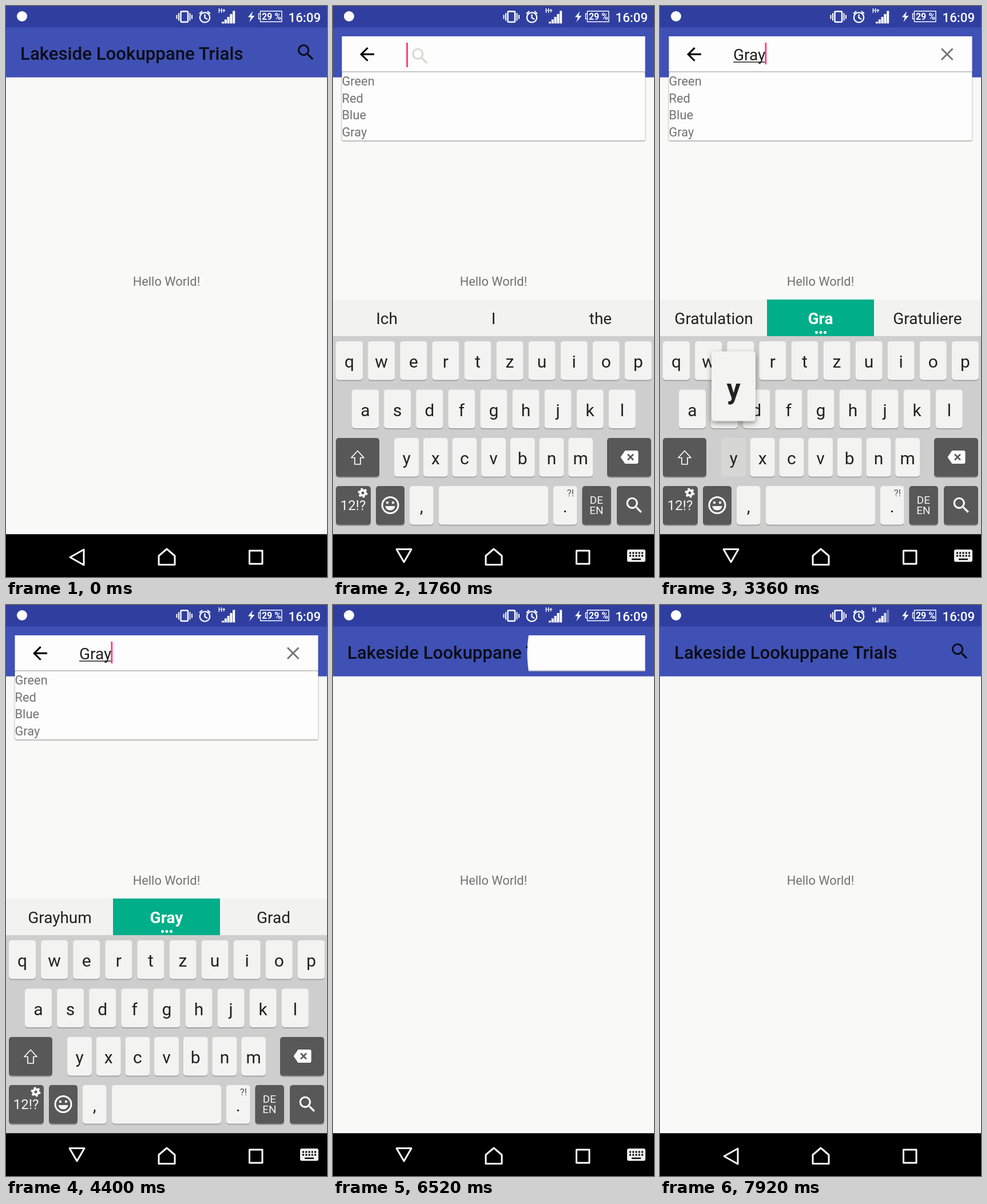
Write an HTML page that moves like this. It is 561 by 998 pixels and loops after 7960 ms.

```html
<!DOCTYPE html>
<html lang="en">
<head>
<meta charset="utf-8">
<title>Search bar demo</title>
<style>
html, body { margin: 0; width: 100%; height: 100%; overflow: hidden; background: #f9f9f8; }
svg { display: block; font-family: Roboto, sans-serif; }
body > svg { width: 100vw; height: 100vh; }
.mid { text-anchor: middle; }
.small { font-size: 21.8px; fill: #727272; }
.line { fill: none; stroke: #fff; stroke-width: 3; stroke-linejoin: round; }
#kb { font-size: 30px; fill: #212121; }
#kb .word { font-size: 28px; }
#popup { filter: drop-shadow(0 4px 5px #0006); }
#sheet { filter: drop-shadow(0 1px 1px #0007); }
</style>
</head>
<body>
<svg viewBox="0 0 561 998">
  <defs>
    <path id="lens" d="M15.5 14h-.79l-.28-.27A6.47 6.47 0 0 0 16 9.5 6.5 6.5 0 1 0 9.5 16c1.61 0 3.09-.59 4.23-1.57l.27.28v.79l5 4.99L20.49 19zm-6 0a4.5 4.5 0 1 1 0-9 4.5 4.5 0 0 1 0 9z"/>
    <clipPath id="reveal"><circle id="hole" cx="545" cy="84"/></clipPath>
  </defs>
  <rect width="561" height="998" fill="#f9f9f8"/>
  <rect width="561" height="124.7" fill="#3f51b5"/>
  <rect width="561" height="37.5" fill="#303f9f"/>

  <g id="status" fill="#fff">
    <circle cx="28" cy="18" r="9"/>
    <rect x="305.5" y="9.5" width="12.5" height="18.5" rx="1.5" class="line" style="stroke-width:2.5"/>
    <path d="M302 12.5v13M298.5 15.5v7M321.5 12.5v13M325 15.5v7" class="line" style="stroke-width:2"/>
    <g class="line" style="stroke-width:2.3">
      <circle cx="347.5" cy="20" r="8.7"/>
      <path d="M347.5 14.5v6l4.5 2.7M338 13.5l5-4.5M357 13.5l-5-4.5"/>
    </g>
    <text id="net" x="371" y="12" font-size="10" font-weight="700">H+</text>
    <g id="bars"></g>
    <path d="M431.5 9l-8.5 10.5h5l-2.5 8.500 9-11h-5.5z"/>
    <path d="M444.5 9h37.500v18.500h-37.500zM444 13.500h-2.500v9h2.500" class="line" style="stroke-width:1.4"/>
    <text x="464" y="24" class="mid" font-size="16" font-weight="700">29 %</text>
    <text x="493.5" y="27.7" font-size="22.3" font-weight="500">16:09</text>
  </g>

  <text x="25" y="94" font-size="31.2" font-weight="500" fill="#0b0d17">Lakeside Lookuppane Trials</text>
  <use href="#lens" transform="translate(505.3 62.3) scale(1.558)" fill="#0b0d17"/>
  <text x="280.5" y="489" class="mid small">Hello World!</text>

  <g id="list">
    <rect id="sheet" x="15.5" y="115" width="530" rx="3" fill="#fdfdfd"/>
    <svg id="rows" x="15.5" y="115" width="530" class="small"></svg>
  </g>

  <g clip-path="url(#reveal)">
    <rect x="15.5" y="53" width="530" height="62.3" fill="#fdfdfd"/>
    <g id="field">
      <path d="M15.5 115h530" stroke="#b4b4b4" stroke-width="1.5"/>
      <path transform="translate(40.8 65.7) scale(1.558)" d="M20 11H7.83l5.59-5.59L12 4l-8 8 8 8 1.41-1.41L7.83 13H20z"/>
      <use id="hint" href="#lens" transform="translate(133.5 69) scale(1.558)" fill="#d8d8d5"/>
      <text id="query" x="128" y="94.5" font-size="28" fill="#212121"></text>
      <path id="under" stroke="#212121" stroke-width="1.6"/>
      <path id="clear" d="M492 74.5l19.5 19.5M511.5 74.5l-19.5 19.5" stroke="#757575" stroke-width="3"/>
      <rect id="cursor" y="64" width="3" fill="#ff4081"/>
    </g>
  </g>

  <g id="kb">
    <rect y="513" width="561" height="64" fill="#f2f3f0"/>
    <rect y="577" width="561" height="347" fill="#cecece"/>
    <g id="pick">
      <rect x="187" y="513" width="187" height="64" fill="#00ae8a"/>
      <path d="M273.5 570.5h.01M281 570.5h.01M288.5 570.5h.01" stroke="#fff" stroke-width="5" stroke-linecap="round"/>
    </g>
    <g id="words" class="mid word"></g>
    <g id="keys" class="mid"></g>
    <path id="shift" d="M43 777.5l11 12h-6v11.5h-10v-11.5h-6z" class="line" style="stroke-width:1.7"/>
    <path d="M502.5 788.5l8-11.5h20q3 0 3 3v17q0 3-3 3h-20z" fill="#fff"/>
    <path d="M515 783.5l10 10M525 783.5l-10 10" stroke="#555" stroke-width="2.5"/>
    <g fill="#f4f4f4" class="mid">
      <text x="35" y="881" font-size="24">12!?</text>
      <circle cx="52" cy="851" r="4.5" fill="none" stroke="#fff" stroke-width="4"/>
      <circle cx="52" cy="851" r="7" fill="none" stroke="#fff" stroke-width="3" stroke-dasharray="3.66"/>
      <circle cx="100" cy="872.5" r="14" class="line"/>
      <circle cx="95" cy="868" r="2.3"/><circle cx="105" cy="868" r="2.3"/>
      <path d="M91.5 874h17a8.5 7.5 0 0 1-17 0z"/>
      <text x="460.5" y="869.5" font-size="19">DE</text>
      <text x="460.5" y="888" font-size="19">EN</text>
      <use href="#lens" transform="translate(508 854) scale(1.558)" fill="#fff"/>
    </g>
    <text x="415" y="857" class="mid" font-size="17" fill="#555">?!</text>
    <g id="popup">
      <rect x="-38.5" width="77" height="122" rx="5" fill="#f3f4f1"/>
      <text id="big" y="82" class="mid" font-size="48" font-weight="700"></text>
    </g>
  </g>

  <rect y="923.2" width="561" height="74.8"/>
  <path id="back" class="line"/>
  <path d="M267 976.5v-15.500l14-12 14 12v15.500zM425.500 952h22.500v23h-22.500z" class="line"/>
  <g id="ime">
    <rect x="514" y="950" width="32" height="21.5" rx="3" fill="#f2f2f2"/>
    <path d="M518 956h24M518 961h24" stroke="#000" stroke-width="3" stroke-dasharray="3 2.25"/>
    <path d="M522 967h16" stroke="#000" stroke-width="2.5"/>
  </g>
</svg>

<script>
const LOOP = 7960, STEP = 40;
const $ = id => document.getElementById(id);
const clamp = x => Math.min(1, Math.max(0, x));
const ease = x => (1 - Math.cos(Math.PI * clamp(x))) / 2;
const show = (id, on) => $(id).style.display = on ? '' : 'none';

function add(parent, tag, attrs, text) {
  const el = document.createElementNS('http://www.w3.org/2000/svg', tag);
  for (const k in attrs) el.setAttribute(k, attrs[k]);
  if (text) el.textContent = text;
  return parent.appendChild(el);
}

// Keyboard
const keys = {};
function key(name, x, y, w, dark) {
  const box = { x, y, width: w, height: 67.5, rx: 5 };
  const shade = add($('keys'), 'rect', { ...box, y: y + 2, fill: dark ? '#8d8d8d' : '#a6a6a6' });
  const face = add($('keys'), 'rect', { ...box, fill: dark ? '#585858' : '#f3f4f1' });
  const label = name.length === 1 &&
    add($('keys'), 'text', { x: x + w / 2, y: y + 46 }, name);
  keys[name] = { cx: x + w / 2, y, face, shade, label };
}
const row = (chars, x, y, pitch, w) => [...chars].forEach((c, i) => key(c, x + i * pitch, y, w));
row('qwertzuiop', 5, 586, 56.1, 47);
row('asdfghjkl', 33, 670.5, 56.1, 47);
row('yxcvbnm', 107, 755, 50.7, 43);
key('shift', 5, 755, 76, true);
key('delete', 479, 755, 77, true);
key('digits', 5, 839, 61, true);
key('smile', 75, 839, 50, true);
key(',', 134, 839, 41.5);
key('space', 185, 839, 191);
key('.', 385, 839, 41.5);
key('lang', 435.5, 839, 50.5, true);
key('search', 496, 839, 60, true);

const words = [94, 280.5, 467.5].map(x => add($('words'), 'text', { x, y: 556 }));
const bars = [3, 7, 11.5, 16.5, 22].map((h, i) =>
  add($('bars'), 'rect', { x: 377 + i * 4.8, y: 30.5 - h, width: 4, height: h }));
['Green', 'Red', 'Blue', 'Gray', 'Gray'].forEach((s, i) =>
  add($('rows'), 'text', { x: 0, y: 24 + i * 29.6 }, s));

// Pressed letters: key, popup start, commit, popup end
const presses = [
  ['g', 2640, 2680, 2800],
  ['r', 2840, 2920, 3000],
  ['a', 3040, 3120, 3240],
  ['y', 3280, 3360, 3520],
];
const guesses = [
  [0, 'Ich', 'I', 'the'],
  [2720, 'Gut', 'G', 'Good'],
  [2960, 'Groß', 'Gr', 'Great'],
  [3160, 'Gratulation', 'Gra', 'Gratuliere'],
  [3400, 'Grayhum', 'Gray', 'Grad'],
  [5680, 'Ich', 'I', 'the'],
];
const sessions = [
  { open: 720, close: 5240, rows: 4 },
  { open: 6320, close: 7320, rows: 5 },
];

function drawBar(t, s) {
  const closing = t >= s.close + 22;
  const p = closing ? 1 - ease((t - s.close - 22) / 400) : ease((t - s.open - 29) / 400);
  $('hole').setAttribute('r', 531 * p);
  show('field', !closing);

  const drop = ease((t - s.open - 429) / 290);
  const h = (s.rows * 29.6 + 1.5) * drop;
  show('list', drop > 0 && !closing);
  $('sheet').setAttribute('height', h);
  $('rows').setAttribute('height', h);

  const n = s.rows === 4 ? presses.filter(k => t >= k[2]).length : 0;
  $('query').textContent = 'Gray'.slice(0, n);
  const w = n ? $('query').getComputedTextLength() : 0;
  $('under').setAttribute('d', n ? `M128 98h${w}` : '');
  show('hint', !n);
  show('clear', n);

  const since = n ? t - presses[n - 1][2] : t - s.open;
  show('cursor', Math.floor(since / 520) % 2 === 0);
  $('cursor').setAttribute('x', 128 + w - (n ? 1 : 0));
  $('cursor').setAttribute('height', n ? 38 : 43);
}

function drawKeyboard(t, s) {
  const enter = clamp((t - s.open - 220) / 220), leave = clamp((t - s.close - 180) / 160);
  const vis = enter * (1 - leave);
  show('kb', vis > 0);
  $('kb').style.opacity = vis;
  const lift = (1 - enter) ** 2 + leave ** 2;
  $('kb').setAttribute('transform', `translate(0 ${40 * lift})`);

  const upper = t >= 2320 && t < 2680;
  for (const c in keys) {
    const k = keys[c];
    if (k.label) k.label.textContent = upper ? c.toUpperCase() : c;
    k.face.style.opacity = k.shade.style.opacity = 1;
  }
  $('shift').style.fill = upper ? '#fff' : 'none';
  const tap = (from, to) => t >= from && t < to ? Math.sin(Math.PI * (t - from + 20) / (to - from + 20)) : 0;
  keys.shift.face.style.opacity = 1 - .35 * tap(2280, 2400);
  keys.search.face.style.opacity = 1 - .35 * tap(3840, 4160);

  const press = presses.find(k => t >= k[1] && t < k[3]);
  show('popup', press);
  if (press) {
    const [c, , , end] = press, k = keys[c];
    k.face.style.opacity = .2;
    k.shade.style.opacity = 0;
    $('popup').setAttribute('transform', `translate(${k.cx} ${k.y - 151.5})`);
    $('popup').style.opacity = clamp((end - t) / 100);
    $('big').textContent = c === 'g' ? 'G' : c;
  }

  const [from, ...guess] = guesses.filter(g => t >= g[0]).pop();
  const typed = from > 0 && from < 5680;
  show('pick', typed);
  words.forEach((el, i) => el.textContent = guess[i]);
  words[1].style.fill = typed ? '#fff' : '';
  words[1].style.fontWeight = typed ? 700 : 400;
}

function draw(t) {
  const s = sessions[t < 5800 ? 0 : 1];
  drawBar(t, s);
  drawKeyboard(t, s);
  const up = t >= s.open + 160 && t < s.close + 120;
  $('back').setAttribute('d', up ? 'M111 949.5h26l-13 22.5z' : 'M112 963.5l24-13.5v27z');
  show('ime', up);
  $('net').textContent = t >= 7880 ? 'H' : 'H+';
  bars.forEach((b, i) => b.style.opacity = t >= 7920 && i > 2 ? (i === 3 ? .8 : .35) : 1);
}

const start = performance.now();
function tick() {
  const t = (performance.now() - start) % LOOP;
  draw(Math.floor(t / STEP) * STEP);
  requestAnimationFrame(tick);
}
tick();
</script>
</body>
</html>
```
